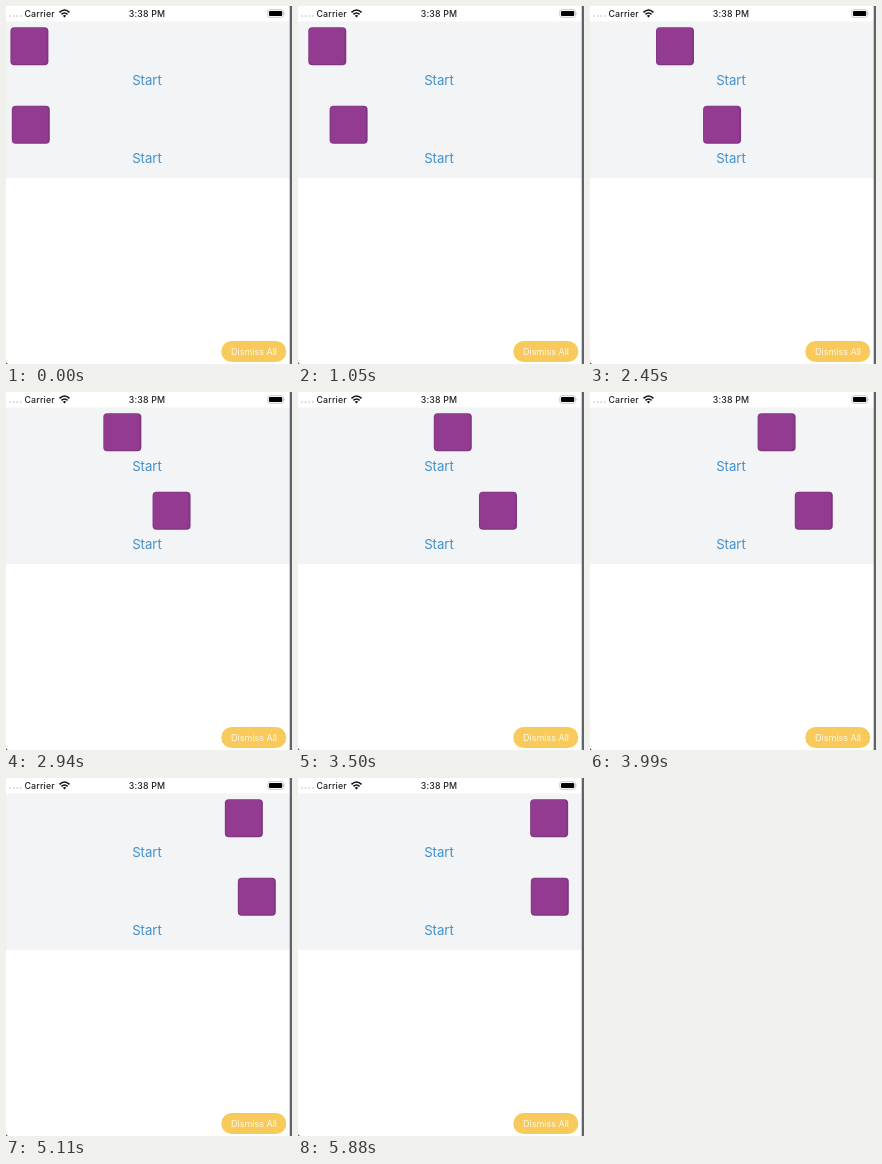
An HTML page for the animation above (6090 ms loop, 286 by 358 pixels).

```html
<!DOCTYPE html>
<html lang="en">
<head>
<meta charset="utf-8">
<title>Sliding squares</title>
<style>
  html, body { margin: 0; width: 100%; height: 100%; overflow: hidden; background: #fff; }
  svg { display: block; width: 286px; height: 358px; font-family: Inter, "Open Sans", sans-serif; }
  .status { font-size: 8.8px; font-weight: 500; letter-spacing: .15px; fill: #222; }
  .start { font-size: 13.2px; fill: #4290cd; text-anchor: middle; }
  .dismiss { font-size: 9px; fill: #fff6e0; text-anchor: middle; }
</style>
</head>
<body>
<svg viewBox="0 0 286 358">
  <defs>
    <filter id="soft"><feGaussianBlur stdDeviation=".4"/></filter>
    <g id="square">
      <rect width="38" height="38" rx="4" fill="#7f3580" filter="url(#soft)"/>
      <rect x=".8" y=".8" width="35.4" height="36" rx="3.4" fill="#933b90" filter="url(#soft)"/>
    </g>
  </defs>

  <rect width="286" height="358" fill="#fff"/>
  <rect y="15.5" width="283.5" height="156.5" fill="#f2f4f6"/>
  <rect x="283.7" width="2.3" height="358" fill="#606468"/>
  <path d="M0 355.5V358H2.5Q0.4 357.6 0 355.5Z" fill="#666"/>

  <path d="M4 10H15" fill="none" stroke="#b4b4b4" stroke-width="1.5"
        stroke-linecap="round" stroke-dasharray="0 3.6"/>
  <text class="status" x="18.5" y="10.7">Carrier</text>
  <g fill="none" stroke="#111" stroke-width="1.6">
    <path d="M53.5 6.3Q58.5 1.7 63.5 6.3"/>
    <path d="M55.4 8.4Q58.5 5.6 61.6 8.4"/>
  </g>
  <path d="M56.8 9.7Q58.5 8.4 60.2 9.7L58.5 11.6Z" fill="#111"/>
  <text class="status" x="141" y="10.7" text-anchor="middle">3:38 PM</text>
  <rect x="261.8" y="3.7" width="15.6" height="7.6" rx="2" fill="#fff" stroke="#b0b0b0" stroke-width=".7"/>
  <rect x="263" y="4.9" width="13.2" height="5.2" rx="1" fill="#000"/>
  <path d="M278.3 6.2Q279.8 7.5 278.3 8.8Z" fill="#b0b0b0"/>

  <text class="start" x="141" y="78.7">Start</text>
  <text class="start" x="141" y="157.4">Start</text>
  <use id="upper" href="#square"/>
  <use id="lower" href="#square"/>

  <rect x="215.3" y="335" width="65" height="21" rx="10.5" fill="#f8ca5c" filter="url(#soft)"/>
  <text class="dismiss" x="248" y="348.6">Dismiss All</text>
</svg>
<script>
  const LOOP = 6090, TICK = 70;
  const SLIDE = 5700, LEFT = 4.4, RIGHT = 232.8;

  // The lower square is already moving when the loop begins.
  const squares = [
    { node: document.getElementById("upper"), y: 21.2, start: 400 },
    { node: document.getElementById("lower"), y: 99.8, start: -320 }
  ];

  const bezier = (u, a, b) => 3 * u * (1 - u) ** 2 * a + 3 * u * u * (1 - u) * b + u ** 3;

  // Same curve as CSS ease-in-out, solved by bisection.
  function easeInOut(progress) {
    let low = 0, high = 1;
    for (let i = 0; i < 20; i++) {
      const mid = (low + high) / 2;
      if (bezier(mid, 0.42, 0.58) < progress) low = mid;
      else high = mid;
    }
    return bezier(low, 0, 1);
  }

  function draw(elapsed) {
    const time = Math.floor((elapsed % LOOP) / TICK) * TICK;
    for (const { node, y, start } of squares) {
      const progress = Math.min(1, Math.max(0, (time - start) / SLIDE));
      const x = LEFT + (RIGHT - LEFT) * easeInOut(progress);
      node.setAttribute("transform", `translate(${x} ${y})`);
    }
  }

  const began = performance.now();
  function frame() {
    draw(performance.now() - began);
    requestAnimationFrame(frame);
  }
  frame();
</script>
</body>
</html>
```
